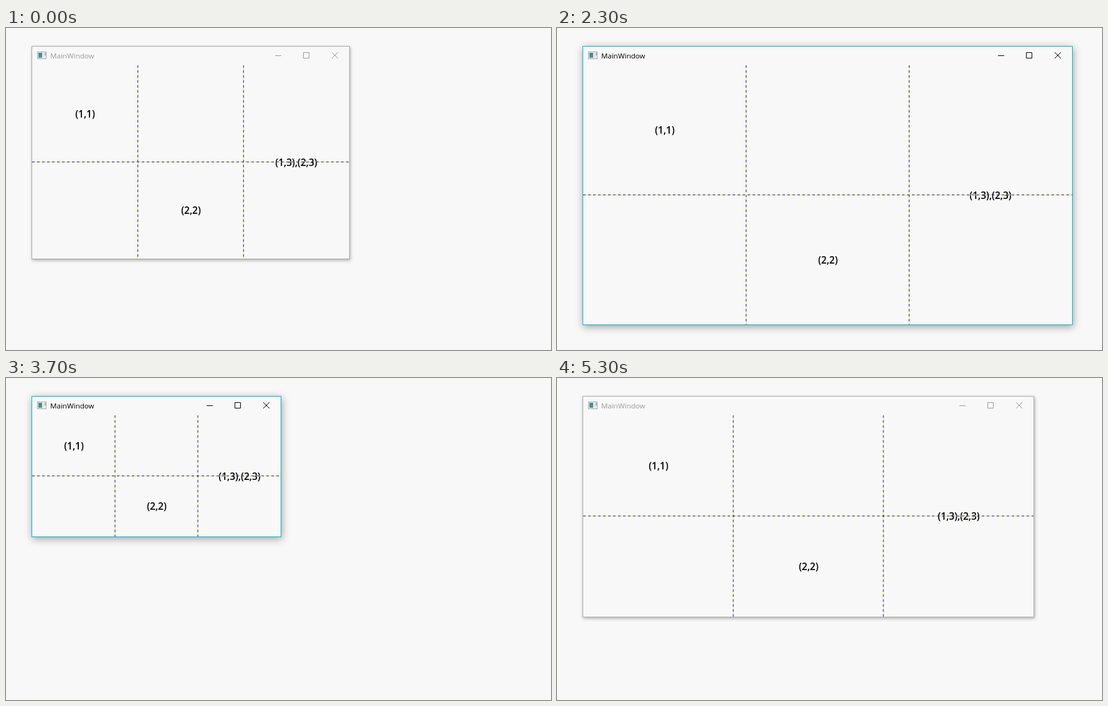
An HTML page for the animation above (5.4 s loop, 875 by 518 pixels).

```html
<!DOCTYPE html>
<html lang="en">
<head>
<meta charset="utf-8">
<title>Window resize</title>
<style>
  html, body { margin: 0; width: 100%; height: 100%; overflow: hidden; background: #f8f8f8; }
  #frame {
    position: absolute; left: 41px; top: 29px; box-sizing: border-box;
    background: #f8f8f8; border: 1px solid #aaa;
    box-shadow: 1px 2px 5px rgba(0, 0, 0, .3);
  }
  .active #frame { border-color: #00b7c3; box-shadow: 1px 3px 12px rgba(0, 0, 0, .36); }
  svg { position: absolute; left: 0; top: 0; }
  text { font-family: "Open Sans", "Noto Sans", sans-serif; }
  #caption { font-size: 11.6px; fill: #999; }
  .active #caption { fill: #000; }
  #buttons { fill: none; stroke: #999; }
  .active #buttons { stroke: #000; }
  .label { font-size: 15.5px; font-weight: 600; text-anchor: middle; }
  .blue, .yellow { stroke: #00f; stroke-dasharray: 4 4; }
  .yellow { stroke: #ff0; stroke-dashoffset: 4; }
</style>
</head>
<body>
<div id="frame"></div>
<svg width="875" height="518">
  <defs>
    <linearGradient id="pane" x2="0" y2="1">
      <stop stop-color="#3f7f96"/><stop offset="1" stop-color="#5c9c86"/>
    </linearGradient>
  </defs>
  <g>
    <rect x="50.5" y="38.5" width="14" height="11" fill="#f3f4f5" stroke="#a0a5aa"/>
    <rect x="52" y="40" width="6" height="8" fill="url(#pane)"/>
    <rect x="59" y="40" width="3" height="8" fill="#dfe4e8"/>
    <rect x="62" y="40" width="2" height="4" fill="#9fbccb"/>
  </g>
  <text id="caption" x="71" y="49">MainWindow</text>
  <g id="buttons">
    <path d="M-119 44.5h10M-73.5 39.5h9v9h-9z"/>
    <path d="M-28 39l10 10M-18 39l-10 10"/>
  </g>
  <text class="label" data-col="0.5" data-row="0.25">(1,1)</text>
  <text class="label" data-col="1.5" data-row="0.75">(2,2)</text>
  <text class="label" data-col="2.5" data-row="0.5">(1,3),(2,3)</text>
  <g id="grid"></g>
</svg>
<script>
const LOOP = 5400, STEP = 100;
const LEFT = 42, TOP = 60;
const ACTIVE_FROM = 600, ACTIVE_TO = 5300;

// Turning points of the dragged corner
const corner = [
  { at: 0, x: 551, y: 371 },
  { at: 1800, x: 551, y: 371 },
  { at: 1900, x: 563, y: 380 },
  { at: 2300, x: 827, y: 477 },
  { at: 2400, x: 818, y: 484 },
  { at: 2900, x: 449, y: 490 },
  { at: 3000, x: 404, y: 490 },
  { at: 3300, x: 360, y: 377 },
  { at: 3600, x: 366, y: 256 },
  { at: 4100, x: 740, y: 250 },
  { at: 4200, x: 740, y: 250 },
  { at: 4800, x: 765, y: 383 },
  { at: 4900, x: 765, y: 384 },
  { at: LOOP, x: 765, y: 384 }
];

const frame = document.getElementById('frame');
const buttons = document.getElementById('buttons');
const grid = document.getElementById('grid');
const labels = document.querySelectorAll('.label');

function setAttrs(node, attrs) {
  for (const name in attrs) node.setAttribute(name, attrs[name]);
}

function addLine(className) {
  const line = document.createElementNS('http://www.w3.org/2000/svg', 'line');
  line.setAttribute('class', className);
  return grid.appendChild(line);
}

const [firstColumn, secondColumn, row] =
  [0, 1, 2].map(() => ['blue', 'yellow'].map(addLine));

function drawLine(dashes, x1, y1, x2, y2) {
  dashes.forEach(dash => setAttrs(dash, { x1, y1, x2, y2 }));
}

function cornerAt(time) {
  const next = corner.findIndex(key => key.at > time);
  const from = corner[next - 1], to = corner[next];
  const progress = (time - from.at) / (to.at - from.at);
  const mix = axis => Math.round(from[axis] + (to[axis] - from[axis]) * progress);
  return [mix('x'), mix('y')];
}

function layout(right, bottom) {
  const column = (right - LEFT) / 3, height = bottom - TOP;
  const middle = TOP + height / 2;

  frame.style.width = right - 40 + 'px';
  frame.style.height = bottom - 28 + 'px';
  buttons.setAttribute('transform', `translate(${right})`);

  labels.forEach(label => setAttrs(label, {
    x: Math.round(LEFT + column * label.dataset.col),
    y: Math.round(TOP + height * label.dataset.row + 6.2)
  }));

  drawLine(firstColumn, LEFT + column, TOP, LEFT + column, bottom);
  drawLine(secondColumn, LEFT + column * 2, TOP, LEFT + column * 2, bottom);
  drawLine(row, LEFT, middle, right, middle);
}

function render() {
  const time = performance.now() % LOOP;
  document.body.classList.toggle('active', time >= ACTIVE_FROM && time < ACTIVE_TO);
  layout(...cornerAt(Math.floor(time / STEP) * STEP));
  requestAnimationFrame(render);
}

render();
</script>
</body>
</html>
```
